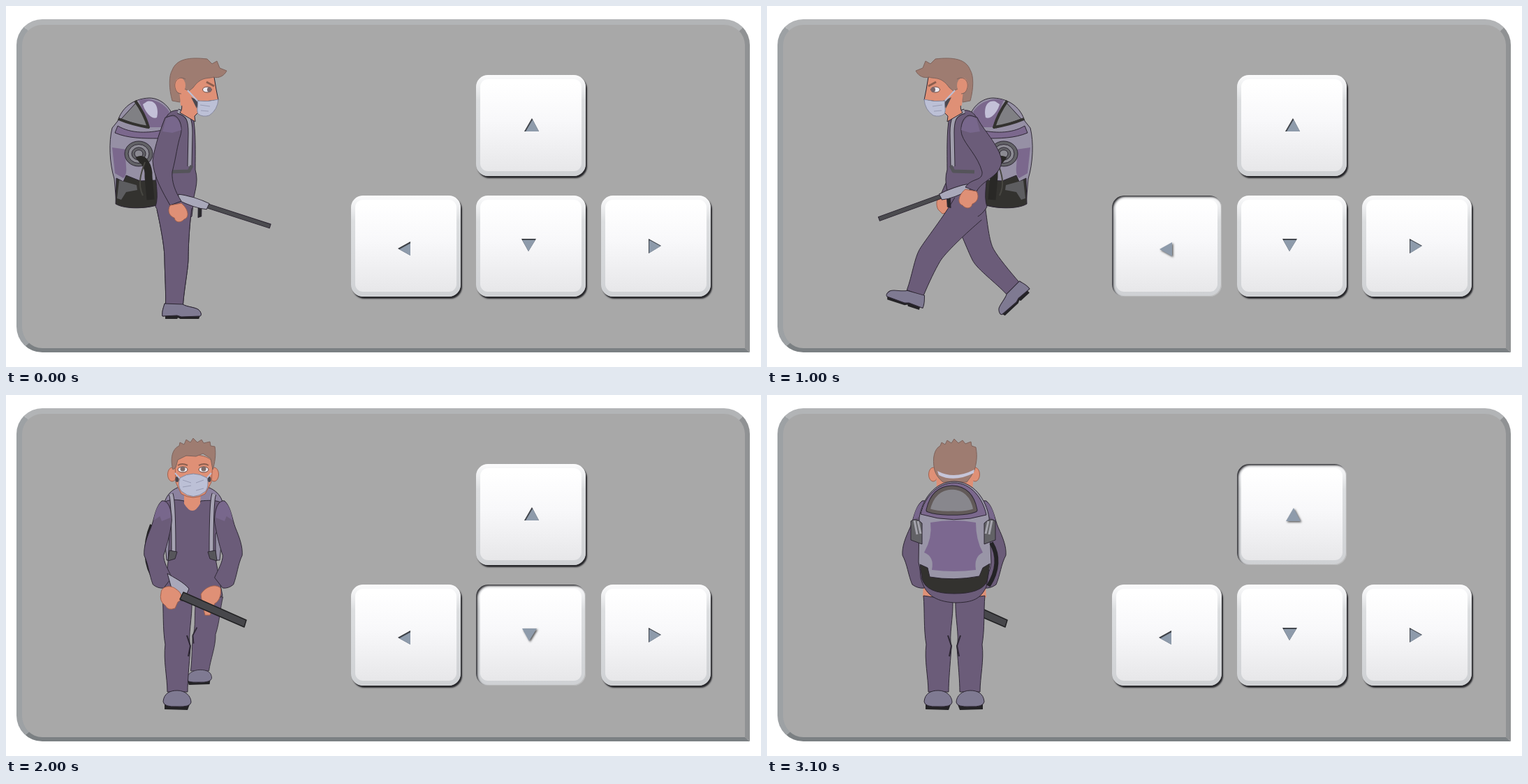
Write an HTML page with a canvas that moves like this. It is 1081 px wide and 518 px high and loops after 3.2 s.

```html
<!DOCTYPE html>
<html lang="en">
<head>
<meta charset="utf-8">
<title>Arrow keys walk</title>
<style>
html, body { margin: 0; width: 100%; height: 100%; overflow: hidden; background: #fff; }
canvas { position: absolute; left: 0; top: 0; }
.panel {
  position: absolute; left: 15px; top: 19px; width: 1050px; height: 478px; box-sizing: border-box;
  border: solid; border-width: 8px 7px 6px 8px; border-color: #b2b4b6 #909294 #7b8083 #9da1a4;
  border-radius: 37px 37px 0 37px; background: #a8a8a8;
}
.key {
  position: absolute; width: 157px; height: 145px; border-radius: 17px;
  background: linear-gradient(#fcfcfd, #dcdee0 25%, #cfd1d4);
  box-shadow: 2px 3px 2px #26262a;
}
.key::before {
  content: ""; position: absolute; inset: 6px 6px 7px; border-radius: 11px;
  background: linear-gradient(#fff 5%, #f8f8fa 45%, #f2f2f4 65%, #e7e7e9);
}
.key.down { box-shadow: inset 2px 2px 3px #2c2c30, inset -1px -1px 1px #bbb; }
</style>
</head>
<body>
<div class="panel"></div>
<canvas width="1081" height="518"></canvas>
<script>
const c = document.querySelector('canvas').getContext('2d');
const INK = '#2d2733', SUIT = '#6b5c79', SUIT_LIGHT = '#78678c', SKIN = '#df9076', HAIR = '#9e7c71',
  MASK = '#bcc0d6', PACK = '#9690a5', PURPLE = '#7b688d', DARK = '#33322f', GREY = '#626266',
  SHOE = '#7f7a92', SLATE = '#8e9bab';

// up, left, down, right: key corner and arrow outline
const keys = [
  [673, 99, 'M753,161L763,180H742Z'],
  [494, 272, 'M561,348L579,338V358Z'],
  [673, 272, 'M738,334H759L748,352Z'],
  [852, 272, 'M920,334L938,344L920,355Z']
].map(([x, y, arrow]) => {
  const el = document.createElement('div');
  el.className = 'key';
  el.style.left = x + 'px';
  el.style.top = y + 'px';
  document.querySelector('.panel').after(el);
  return { el, arrow: new Path2D(arrow) };
});

function shape(fill, d, line = INK, width = 1) {
  const path = new Path2D(d);
  if (fill) { c.fillStyle = fill; c.fill(path); }
  if (line) { c.strokeStyle = line; c.lineWidth = width; c.stroke(path); }
}
function oval(fill, x, y, rx, ry = rx, line = INK) {
  c.beginPath();
  c.ellipse(x, y, rx, ry, 0, 0, 7);
  c.fillStyle = fill;
  c.fill();
  if (line) { c.strokeStyle = line; c.lineWidth = 1; c.stroke(); }
}
function within(matrix, draw) {
  c.save();
  c.transform(...matrix);
  draw();
  c.restore();
}
const turned = (x, y, deg, draw) => {
  const a = deg * Math.PI / 180, s = Math.sin(a), k = Math.cos(a);
  within([k, s, -s, k, x, y], draw);
};
const flipped = (sum, draw) => within([-1, 0, 0, 1, sum, 0], draw);

function drawArrow({ arrow }, down) {
  c.save();
  if (down) {
    c.translate(1, 1);
    c.shadowColor = '#555';
    c.shadowBlur = 3;
    c.shadowOffsetX = c.shadowOffsetY = 1.5;
    c.fillStyle = SLATE;
    c.fill(arrow);
  } else {
    c.fillStyle = '#2b2d31';
    c.fill(arrow);
    c.clip(arrow);
    c.translate(1.2, 2);
    c.shadowColor = SLATE;
    c.shadowBlur = 3;
    c.fillStyle = SLATE;
    c.fill(arrow);
  }
  c.restore();
}

/* ---- side view, facing right ---- */

// knee x, y, ankle x, y, foot angle
const STAND = [244, 362, 241, 428, 0];
const STEPS = [
  [270, 360, 214, 388, 70],
  [288, 350, 278, 410, 14],
  [296, 358, 317, 412, -18],
  [260, 362, 256, 428, 0],
  [246, 362, 222, 423, 9],
  [219, 358, 177, 405, 43]
];

function sideLeg([kx, ky, ax, ay, angle]) {
  const H = [241, 291], K = [kx, ky], A = [ax, ay];
  const unit = (x, y) => [x / Math.hypot(x, y), y / Math.hypot(x, y)];
  const thigh = unit(kx - H[0], ky - H[1]), shin = unit(ax - kx, ay - ky);
  const mid = unit(thigh[0] + shin[0], thigh[1] + shin[1]);
  const off = ([x, y], d, w, s = 0) => [x - d[1] * w + d[0] * s, y + d[0] * w + d[1] * s];
  const edge = w => [off(H, thigh, 25 * w), off(H, thigh, 20 * w, 28), off(K, mid, 17 * w, -14),
    off(K, mid, 17 * w), off(K, mid, 17 * w, 14), off(A, shin, 13 * w, -22), off(A, shin, 12.5 * w)];
  const a = edge(1), b = edge(-1).reverse();
  shape(SUIT, `M${a[0]}C${a.slice(1).join(' ')}L${b[0]}C${b.slice(1).join(' ')}`);
  turned(ax, ay, angle, () => {
    shape('#242326', 'M-13,15H37L35,21H9L5,19L4,21H-13Z', null);
    shape(SHOE, 'M-14,-1L12,0C18,4 30,4 35,8C39,12 39,16 37,17L10,18L4,16L-17,17C-18,9 -15,4 -14,-1Z');
  });
}

function sidePack() {
  shape(PACK, 'M160,165C165,148 180,133 205,132C222,132 234,145 238,156L242,240L218,285C200,292 170,290 158,283L155,248C148,225 147,195 152,175Z');
  shape(PURPLE, 'M190,135C205,130 226,138 234,152L224,174L205,174Z', null);
  shape('#c3c0d7', 'M202,137C215,134 219,148 216,160C208,164 198,150 196,141Z', null);
  shape('#808084', 'M186,139L203,167L201,175L165,162Z');
  shape(null, 'M185,136Q198,154 204,174Q180,170 161,162', DARK, 4);
  shape(PURPLE, 'M160,172C180,184 205,182 224,178L220,190C195,190 175,190 156,182Z');
  shape(PURPLE, 'M152,203L173,206C168,225 177,238 168,247L156,240Z', null);
  [20, 15, 10, 6].forEach((r, i) => oval(i % 2 ? '#8b8a92' : GREY, 190, 212, r, r * .9));
  shape(DARK, 'M158,247L168,252L172,243L192,251L215,250L224,282C205,292 170,292 157,284Z');
  shape('#5d5d60', 'M162,250L187,257L188,264L172,267L165,278L159,276Z', null);
  shape(null, 'M189,222C196,216 205,230 204,245L207,278', '#292826', 11);
  shape(null, 'M199,224C193,240 188,256 196,272', '#474641', 2);
}

function sideHead() {
  shape(SKIN, 'M256,108C265,100 285,95 298,102L301,120L304,135L274,138L275,153L270,158L271,166L249,153C255,146 250,135 246,122Z');
  shape(HAIR, 'M238,136C233,118 233,100 238,92C244,76 262,73 288,76L295,83L302,79L306,89L316,93C312,101 304,104 297,102C290,105 280,100 268,117L262,122L250,116L249,138Z', '#7d625b');
  oval(SKIN, 249, 114, 8, 11, null);
  shape(SKIN, 'M248,120L264,123L266,142L250,143Z', null);
  shape(null, 'M257,105C249,100 240,106 242,117Q244,126 251,126', '#7d625b');
  shape('#4b4850', 'M265,131L277,136L273,147Z', null);
  shape(null, 'M260,121L275,137', MASK, 2);
  shape(MASK, 'M274,136Q290,138 304,134Q303,149 291,157Q282,160 275,155C272,148 276,142 274,136Z', '#85879c');
  shape(null, 'M278,142L292,144M279,150L290,151', '#989bb3');
  oval('#eeeaf0', 288, 120, 6.5, 4, '#6c4c45');
  oval('#77656a', 291, 120, 3, 3.5, null);
  shape(null, 'M287,109L298,115', '#8c5e4e', 3);
}

function sideGun(x, y, angle) {
  turned(x, y, angle, () => {
    shape('#29292b', 'M37,4L41,17L37,20L33,7Z');
    shape('#4b4b4f', 'M44,-3H139V3H44Z');
    shape('#a9a8ba', 'M0,-3C12,-6 33,-6 46,-4L45,5C33,8 15,7 2,5Z');
  });
}

function sideArm(ex, hx, hy) {
  shape(SUIT, `M228,160C222,175 ${ex + 3},200 ${ex},222C${ex + 1},245 ${hx - 22},${hy - 30} ${hx - 12},${hy - 12}
    L${hx + 4},${hy - 18}C${hx - 5},${hy - 32} ${ex + 27},252 ${ex + 28},238C${ex + 34},215 245,200 250,185C254,170 246,156 238,157Z`);
  shape(SUIT_LIGHT, 'M229,162C238,154 249,160 251,178L238,182L224,180Z', null);
  shape(SKIN, `M${hx - 12},${hy - 12}C${hx - 17},${hy - 3} ${hx - 12},${hy + 4} ${hx - 6},${hy + 6}
    C${hx - 4},${hy + 14} ${hx + 4},${hy + 13} ${hx + 8},${hy + 8}C${hx + 17},${hy + 5} ${hx + 13},${hy - 8} ${hx + 4},${hy - 15}Z`, '#a0604d');
}

function side(p) {
  const swing = .6 + .4 * Math.cos((p - 2) * Math.PI / 3);
  sidePack();
  sideLeg(p ? STEPS[(p + 3) % 6] : STAND);
  if (p) {
    shape(SUIT, 'M258,240C272,245 275,260 280,270L268,276L258,268Z');
    shape(SKIN, 'M268,271L280,269C286,276 288,284 284,292L278,298L268,296Z', '#a0604d');
  }
  shape(SUIT, 'M236,152C248,146 256,152 268,160C272,180 271,210 271,235C277,255 268,268 268,285L266,302C250,314 225,308 214,288C220,270 212,250 214,220C218,190 224,160 236,152Z');
  shape(null, 'M246,151C262,155 264,165 264,182L263,230', INK, 7);
  shape(null, 'M246,151C262,155 264,165 264,182L263,230', '#a09eac', 5);
  shape(null, 'M232,238L262,237L266,229', '#55545a', 5);
  sideLeg(p ? STEPS[p % 6] : STAND);
  if (p) sideGun(242 - 4 * swing, 283 - 25 * swing, 8 + 12 * swing);
  else sideGun(246, 273, 18);
  if (p) sideArm(207 - 14 * swing, 241, 292 - 14 * swing);
  else sideArm(210, 247, 298);
  sideHead();
}

/* ---- front and back views ---- */

// positive lifts the right leg, negative the left
const LIFT = [0, .5, 1, 1, -.5, -1, 0];

function uprightLeg(lift) {
  const up = Math.max(0, lift);
  within([1 - .1 * up, 0, .1 * up, 1 - .23 * up, 24.5 * up - 29.5 * up, 295 * .23 * up], () => {
    shape(SUIT, 'M224,288L266,294C267,320 260,345 264,362C262,390 260,410 260,426L231,426C231,405 225,380 228,358C224,335 226,310 224,288Z');
    shape(null, 'M259,345L264,360L261,375', INK, 2);
    shape('#242326', 'M227,444H263L260,452L227,451Z', null);
    shape(SHOE, 'M225,440C226,428 235,424 245,424C257,424 265,432 265,441Q264,448 245,447Q226,448 225,440Z');
  });
}
function uprightLegs(lift) {
  const left = () => uprightLeg(-lift), right = () => flipped(536, () => uprightLeg(lift));
  if (lift > 0) { right(); left(); } else { left(); right(); }
}

function uprightArm(reach) {
  within([reach, 0, 0, 1, 232 * (1 - reach), 0], () => {
    shape(SUIT, 'M222,152C212,160 210,178 205,190C198,205 193,218 194,230C201,243 202,258 208,272Q216,278 225,277L238,262C232,250 225,240 225,230C231,215 237,190 238,180C238,160 230,150 222,152Z');
    shape(SUIT_LIGHT, 'M222,153C214,159 211,170 209,180L219,174L222,181L236,176C236,160 230,152 222,153Z', null);
  });
}
function uprightArms(lift) {
  uprightArm(1 - .1 * lift);
  flipped(536, () => uprightArm(1 - .1 * lift));
}

function ears() {
  oval(SKIN, 238, 114, 6.5, 10, '#a0604d');
  oval(SKIN, 298, 114, 6.5, 10, '#a0604d');
}
function barrel(x, y) {
  shape('#47474b', `M${x},${y}L344,323L341,333L${x - 5},${y + 10}Z`, '#222224', 1.5);
}

function frontHead() {
  shape(SKIN, 'M255,138H279L278,156Q267,176 255,156Z', null);
  ears();
  shape(SKIN, 'M242,98C243,82 293,82 296,98L294,125L285,142Q268,152 251,142L243,125Z', '#a0604d');
  shape(HAIR, 'M239,107C234,88 240,76 248,73L249,68L255,71L258,64L264,68L268,62L274,68L280,64L283,69L292,67L293,73L299,74C301,85 299,98 296,107L293,91L282,84L272,88L258,87L246,93L243,104Z', '#7d625b');
  for (const x of [253, 283]) {
    oval('#eeeaf0', x, 107, 7, 4, '#6c4c45');
    oval('#7e6b68', x, 106, 3.5, 3.5, null);
  }
  shape(null, 'M246,101Q252,97 260,101M276,101Q284,97 290,101', '#8c5e4e', 2);
  oval('#4b4850', 245, 121, 2.5, 4, null);
  oval('#4b4850', 291, 121, 2.5, 4, null);
  shape(null, 'M242,112L250,121M294,112L286,121', MASK, 2);
  shape(MASK, 'M249,119Q268,107 288,119Q291,130 286,138Q268,153 251,138Q245,130 249,119Z', '#85879c');
  shape(null, 'M253,122L265,126M283,122L272,126M253,132L265,130M283,134L272,137', '#989bb3');
}

function front(p) {
  const lift = LIFT[p];
  shape('#8d83a0', 'M226,158C230,138 245,129 268,129C290,129 308,138 311,158Z');
  shape('#918ba2', 'M224,170H312L306,237H230Z');
  if (lift) shape(null, 'M208,186C196,215 198,245 213,266', '#242326', 4);
  uprightLegs(lift);
  shape(SUIT, 'M222,158C230,148 245,150 255,152Q267,176 279,152C300,150 310,152 316,162L300,200L300,235L310,288C285,302 250,298 226,287L232,240L234,200Z');
  shape(null, 'M226,246L232,258M311,243L304,255', '#242326', 3);
  for (const sum of [0, 534]) {
    const strap = () => {
      shape(null, 'M236,142Q240,150 240,225', INK, 7);
      shape(null, 'M236,142Q240,150 240,225', '#a6a3b3', 5);
      shape('#56555a', 'M234,223L245,225L242,235L232,238Z');
    };
    if (sum) flipped(sum, strap); else strap();
  }
  uprightArms(lift);
  shape(SKIN, 'M279,286C285,275 300,270 307,277C309,288 304,297 299,299L292,316H285L281,300Z', '#a0604d');
  shape('#a9a8ba', 'M231,256C240,262 254,268 262,278L256,292L238,281Z');
  shape(SKIN, 'M222,284C222,275 235,271 244,279C252,284 254,293 246,297L242,306Q232,310 228,302Q219,296 222,284Z', '#a0604d');
  barrel(lift ? 254 : 260, lift ? 283 : 281);
  frontHead();
}

function back(p) {
  const lift = LIFT[p];
  barrel(300, 303);
  shape(SKIN, 'M224,274H236V294L223,290ZM300,274H313L314,290L302,294Z', null);
  uprightLegs(lift);
  uprightArms(lift);
  ears();
  shape(SKIN, 'M242,108H297L294,136H243Z', null);
  shape(HAIR, 'M240,108C236,90 240,77 248,73L250,68L255,71L258,65L264,69L268,63L274,69L280,65L284,70L292,67L293,73L299,75C302,90 299,100 297,108Q292,118 286,125H252Q243,118 240,108Z', '#7d625b');
  shape('#c6c5d8', 'M244,109Q268,122 297,107L296,112Q268,126 246,115Z', null);
  shape(SUIT, 'M218,240L320,240L314,275C306,292 296,298 268,298C240,296 226,286 220,262Z');
  shape('#9995a7', 'M218,176C222,150 240,124 268,124C296,124 314,150 318,176L321,240Q318,278 268,278Q222,278 217,240Z');
  shape(PURPLE, 'M220,171C226,145 245,126 268,126C292,126 309,148 314,172Q268,186 220,171Z');
  shape('#88878d', 'M231,165Q238,134 265,133Q292,134 298,165Q285,170 266,169Q245,170 231,165Z', INK, 7);
  shape('#88878d', 'M231,165Q238,134 265,133Q292,134 298,165Q285,170 266,169Q245,170 231,165Z', '#625a59', 5);
  shape('#7c6890', 'M234,183Q267,177 299,183Q299,208 309,226Q296,232 299,251Q268,255 236,251Q240,232 225,226Q237,205 234,183Z', null);
  shape(DARK, 'M219,243L230,248L233,261Q267,267 304,260L309,248L319,242L315,268Q306,285 268,285Q228,285 222,264Z');
  shape(null, 'M321,212C332,230 331,252 317,274', '#242326', 6);
  for (const sum of [0, 533]) {
    const pad = () => {
      shape(GREY, 'M206,181Q213,175 222,184V214L206,208Z');
      shape(null, 'M211,180L215,200M216,181L220,199', '#a5a4ad', 3);
    };
    if (sum) flipped(sum, pad); else pad();
  }
}

function draw(step) {
  let pressed = -1;
  c.clearRect(0, 0, 1081, 518);
  c.lineJoin = 'round';
  if (step < 8) {
    side(step);
    if (step) pressed = 3;
  } else if (step < 16) {
    flipped(529, () => side(step - 8));
    if (step > 8) pressed = 1;
  } else if (step < 25) {
    const p = step > 17 && step < 24 ? step - 17 : 0;
    front(p);
    if (p) pressed = 2;
  } else {
    back(step - 25);
    if (step > 25) pressed = 0;
  }
  keys.forEach((key, i) => {
    key.el.classList.toggle('down', i === pressed);
    drawArrow(key, i === pressed);
  });
}

const start = performance.now();
function tick() {
  draw(Math.floor((performance.now() - start) / 100) % 32);
  requestAnimationFrame(tick);
}
tick();
</script>
</body>
</html>
```
